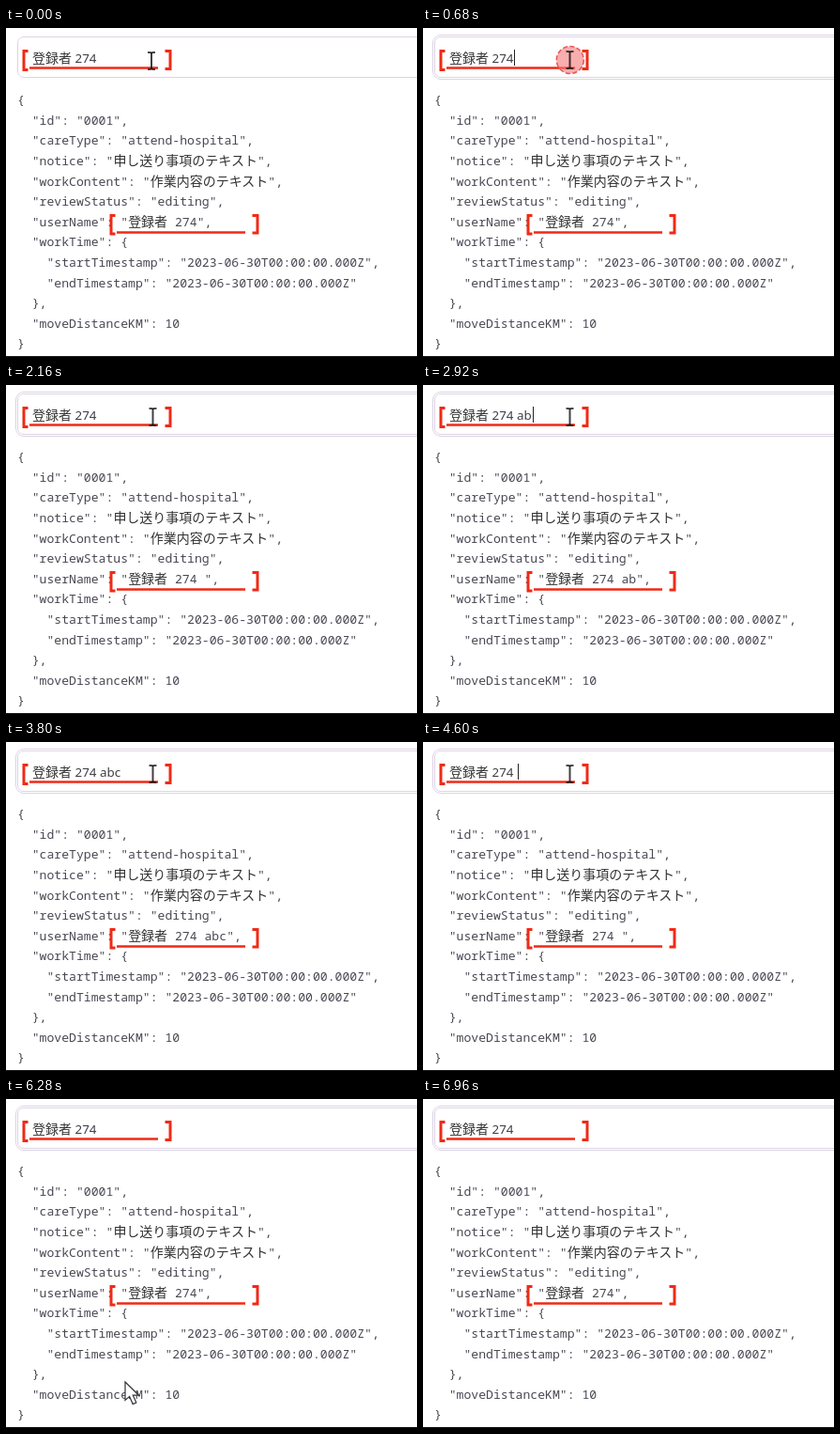
An HTML page for the animation above (7000 ms loop, 438 px wide and 350 px high).

```html
<!DOCTYPE html>
<html lang="ja">
<head>
<meta charset="utf-8">
<title>Input binding</title>
<style>
html, body { margin: 0; width: 100%; height: 100%; overflow: hidden; background: #fff; }
#stage { position: relative; width: 438px; height: 350px; overflow: hidden; color: #4a4752; }
#stage > * { position: absolute; }
.field { left: 12px; top: 9px; width: 460px; height: 42px; border: 1px solid #dfd3e4; border-radius: 7px; }
.ring { left: 10px; top: 7px; width: 460px; height: 46px; border: 1px solid #dad4e4; border-radius: 9px;
  opacity: 0; animation: focus 7s step-end infinite; }
#input { left: 28px; top: 22px; height: 21px; white-space: pre; color: #3f3d46;
  font: 13.4px/21px "Noto Sans", sans-serif; }
#caret { position: absolute; left: 100%; top: 1px; width: 1px; height: 17px; margin-left: 1px; background: #222; }
pre { margin: 0; left: 12px; top: 66.2px; font: 13.14px/21.6px "Noto Sans Mono", monospace; }
b { font: 14px/0 "Noto Sans CJK JP", "Noto Sans CJK", sans-serif; color: #333; }
.floor { left: 0; top: 349px; width: 438px; height: 1px; background: #111; }
svg { left: 0; top: 0; }
.marks { fill: none; stroke: #f02a16; stroke-width: 3; }
.lines { stroke-width: 2.5; }
.click { opacity: 0; fill: #f47c7c; fill-opacity: .62; stroke: #e75a5a; stroke-width: 1.6;
  stroke-dasharray: 5 2.5; animation: click 7s linear infinite; }
.beam { animation: beam 7s linear infinite; }
.arrow { opacity: 0; animation: arrow 7s linear infinite; }
@keyframes focus { 0% { opacity: 0 } 6.857% { opacity: 1 } }
@keyframes click {
  0%, 6.85% { opacity: 0 }
  6.857%, 13.7% { opacity: 1 }
  16.57%, 100% { opacity: 0 }
}
@keyframes beam {
  0%, 6.85% { transform: translate(155px, 35px); opacity: 1 }
  6.857%, 81.14% { transform: translate(156.5px, 34px); opacity: 1 }
  81.7% { transform: translate(152px, 50px); opacity: 1 }
  81.71%, 100% { transform: translate(152px, 50px); opacity: 0 }
}
@keyframes arrow {
  0%, 81.7% { transform: translate(152px, 54px); opacity: 0 }
  81.71% { transform: translate(152px, 54px); opacity: 1 }
  83.43%, 92.57% { transform: translate(127px, 301px); opacity: 1 }
  94.28% { transform: translate(120px, 352px); opacity: 1 }
  94.29%, 100% { transform: translate(120px, 352px); opacity: 0 }
}
</style>
</head>
<body>
<div id="stage">
  <div class="ring"></div>
  <div class="field"></div>
  <div id="input"><b class="name"></b><span class="tail"></span><i id="caret"></i></div>
  <pre>{
  "id": "0001",
  "careType": "attend-hospital",
  "notice": "<b>申し送り事項のテキスト</b>",
  "workContent": "<b>作業内容のテキスト</b>",
  "reviewStatus": "editing",
  "userName": "<b class="name"></b><span class="tail"></span>",
  "workTime": {
    "startTimestamp": "2023-06-30T00:00:00.000Z",
    "endTimestamp": "2023-06-30T00:00:00.000Z"
  },
  "moveDistanceKM": 10
}</pre>
  <div class="floor"></div>
  <svg width="438" height="350">
    <g class="marks">
      <path d="M23.5 24.5H19V44.5H23.5M169.5 24.5H175V43.5H169.5"/>
      <path d="M116.5 199.5H112V219H116.5M262.5 199.5H268V218H262.5"/>
      <path class="lines" d="M25 42.5H162M118 217.5H255"/>
    </g>
    <circle class="click" cx="156.8" cy="34" r="14.5"/>
    <path class="beam" d="M-4 -9H-1L0 -8L1 -9H4M0 -8V8M-4 9H-1L0 8L1 9H4" fill="none" stroke="#111" stroke-width="1.6"/>
    <path class="arrow" d="M0 0V19.5L4.6 15.4L8.2 23.6L11.8 22L8.3 14.2H14.5Z" fill="#fff" stroke="#333" stroke-width="1.2"/>
  </svg>
</div>
<script>
const all = sel => document.querySelectorAll(sel);
const caret = document.getElementById('caret');
const NAME = '登録者', BASE = ' 274', TYPED = ' abc', LOOP = 7000;

// [time, number of typed characters]
const keys = [[0, 0], [1560, 1], [2240, 2], [2800, 3], [3280, 4],
  [4080, 3], [4320, 2], [4480, 1], [4760, 0]];
// [start, end] of each time the caret is lit
const lit = [[480, 1010], [1540, 2080], [2240, 2770], [2800, 3800], [4320, 5280]];

function draw(t) {
  const count = keys.filter(k => k[0] <= t).pop()[1];
  const tail = BASE + TYPED.slice(0, count);
  all('.tail').forEach(el => el.textContent = tail);
  caret.style.opacity = lit.some(([a, b]) => t >= a && t < b) ? 1 : 0;
}

let start;
function tick(now) {
  start ??= now;
  draw((now - start) % LOOP);
  requestAnimationFrame(tick);
}
all('.name').forEach(el => el.textContent = NAME);
draw(0);
requestAnimationFrame(tick);
</script>
</body>
</html>
```
